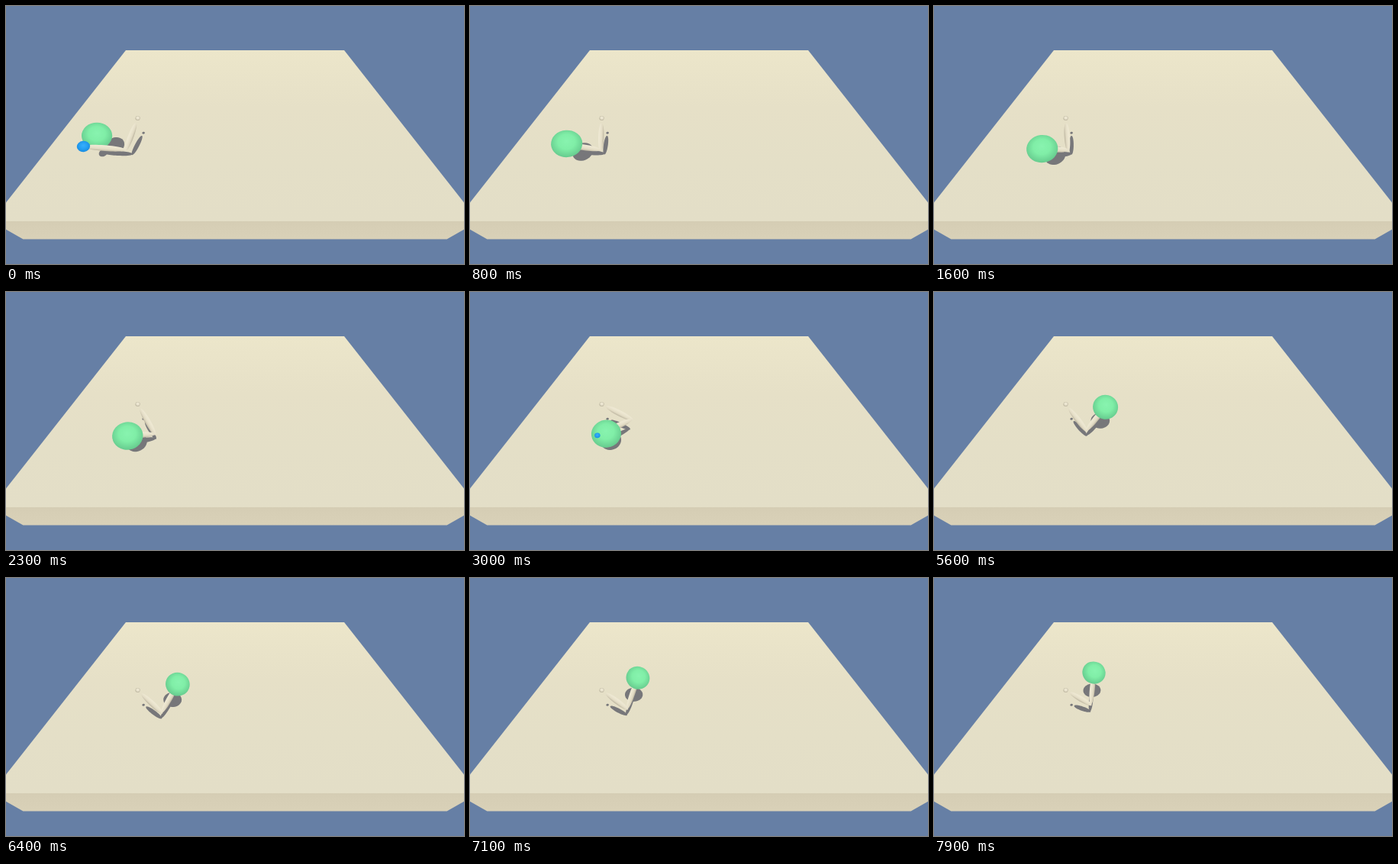
Animation of 600 by 338 pixels, one loop 8000 ms. Source, as an HTML page with a canvas:

```html
<!DOCTYPE html>
<html>
<head>
<meta charset="utf-8">
<style>
html, body { margin: 0; width: 100%; height: 100%; overflow: hidden; background: #667fa5; }
canvas { display: block; }
</style>
</head>
<body>
<canvas id="stage" width="600" height="338"></canvas>
<script>
const ctx = document.getElementById('stage').getContext('2d');
const LOOP = 8000, STEP = 100, SHADOW = '#77777a';
const CX = 300, CY = 169, FOCAL = CY * Math.sqrt(3);

// World points are [right, away, up]; the camera hangs 1 above the table, tilted down 45 degrees
const SHOULDER = [-0.446, 0.779, 0.33];
const UPPER = 0.157, FORE = 0.165, ORBIT = 0.18, BALL_UP = 0.315;
const BALL_R = 0.0565, HAND_R = 0.0235, JOINT_R = 0.0102, LIMB = 0.0265;
const TABLE = { half: 1.113, near: 0.443, far: 2.221, thick: 0.217 };

const { sin, cos, sqrt, exp, hypot, PI } = Math;
const rad = deg => deg * PI / 180;
const pulse = (t, mid, width) => exp(-(((t - mid) / width) ** 2));
const mix = (a, b, k) => a.map((p, i) => p + (b[i] - p) * k);
const along = (p, dir, k) => p.map((v, i) => v + dir[i] * k);
const depth = ([, v, w]) => (v + 1 - w) / Math.SQRT2;
const shade = ([x, v, w]) => [x - 0.42 * w, v + 0.727 * w, 0];

function project(p) {
  const k = FOCAL / depth(p);
  return [CX + p[0] * k, CY + (1 - p[2] - p[1]) / Math.SQRT2 * k];
}

// Ball on a level orbit; the hand chases it and a two-bone solve places the elbow
function pose(t) {
  const orbit = rad(213 + 26.1 * t);
  const swing = pulse(t, 3.2, 1);
  const over = 0.066 * pulse(t, 0, 0.5);
  const lift = 0.065 * pulse(t, 4.4, 0.6);

  const ball = [...along(SHOULDER.slice(0, 2), [cos(orbit), sin(orbit)], ORBIT), BALL_UP];
  const aim = orbit - 0.2 * swing, c = cos(aim), s = sin(aim);
  const flat = ORBIT + over, rise = BALL_UP - SHOULDER[2] + lift - 0.45 * over;
  const hand = along(SHOULDER, [c * flat, s * flat, rise], 1);

  const d = hypot(flat, rise), k = flat / d, m = rise / d;
  const reach = (UPPER ** 2 + d * d - FORE ** 2) / (2 * d);
  const bend = sqrt(UPPER ** 2 - reach ** 2);
  const twist = rad(-20 + 49 * exp(-t / 1.6) + 90 * swing);
  let elbow = along(SHOULDER, [c * k, s * k, m], reach);
  elbow = along(elbow, [-s, c, 0], bend * sin(twist));
  elbow = along(elbow, [c * m, s * m, -k], bend * cos(twist));
  return { ball, hand, elbow };
}

function poly(fill, pts) {
  ctx.fillStyle = fill;
  ctx.beginPath();
  pts.forEach(p => ctx.lineTo(...project(p)));
  ctx.fill();
}

function gradient(g, ...colors) {
  colors.forEach((c, i) => g.addColorStop(i / (colors.length - 1), c));
  return g;
}

function sphere(p, r, ...colors) {
  const [x, y] = project(p), px = FOCAL * r / depth(p);
  ctx.save();
  ctx.translate(x, y);
  ctx.rotate(Math.atan((y - CY) / (x - CX)));
  ctx.scale(px * hypot(1, (x - CX) / FOCAL, (y - CY) / FOCAL), px);
  ctx.fillStyle = gradient(ctx.createRadialGradient(0, -0.2, 0, 0, -0.1, 1.1), ...colors);
  ctx.beginPath();
  ctx.arc(0, 0, 1, 0, 2 * PI);
  ctx.fill();
  ctx.restore();
}

// Disc facing the light, dropped onto the table
function sphereShadow(p, r) {
  const rim = Array.from({ length: 40 }, (_, i) => {
    const a = i * PI / 20, q = along(p, [0.866, 0.5, 0], r * cos(a));
    return shade(along(q, [-0.383, 0.663, 0.643], r * sin(a)));
  });
  poly(SHADOW, rim);
}

function limb(from, to, ...colors) {
  const a = project(from), b = project(to);
  const w = FOCAL * LIMB / depth(mix(from, to, 0.5)) / 2;
  const len = hypot(b[0] - a[0], b[1] - a[1]);
  ctx.save();
  ctx.translate(...a);
  ctx.rotate(Math.atan2(b[1] - a[1], b[0] - a[0]));
  // Keep the lit side up
  if (b[0] < a[0]) ctx.scale(1, -1);
  ctx.fillStyle = gradient(ctx.createLinearGradient(0, -w, 0, w), ...colors);
  ctx.beginPath();
  ctx.moveTo(0, 0);
  ctx.bezierCurveTo(0, -w * 1.33, len, -w * 1.33, len, 0);
  ctx.bezierCurveTo(len, w * 1.33, 0, w * 1.33, 0, 0);
  ctx.fill();
  ctx.restore();
}

const ivory = (a, b) => limb(a, b, '#efe9d4', '#ebe5cf', '#e2dbc4', '#bdb6a1');

function table() {
  const { half, near, far, thick } = TABLE;
  ctx.fillStyle = '#667fa5';
  ctx.fillRect(0, 0, 600, 338);
  poly(gradient(ctx.createLinearGradient(0, 58, 0, 282), '#ece6ca', '#e6e0c7', '#e4dfc7', '#e3dec7'),
    [[-half, far, 0], [half, far, 0], [half, near, 0], [-half, near, 0]]);
  poly(gradient(ctx.createLinearGradient(0, 282, 0, 305), '#d5cdb4', '#d9d1b8'),
    [[-half, near, 0], [half, near, 0], [half, near, -thick], [-half, near, -thick]]);
}

// Radius of the part of the hand that sticks out of the ball
function exposed(ball, hand) {
  const gap = hypot(...along(hand, ball, -1));
  const cut = Math.max(0, (BALL_R ** 2 - gap ** 2 - HAND_R ** 2) / (2 * gap));
  return sqrt(Math.max(0, HAND_R ** 2 - cut ** 2));
}

function draw(t) {
  const { ball, hand, elbow } = pose(t);
  const start = mix(SHOULDER, elbow, 0.15), tip = mix(SHOULDER, elbow, 1.04);
  const drawBall = () => sphere(ball, BALL_R, '#88f3af', '#80eea7', '#66cb8e');
  const drawFore = () => ivory(elbow, hand);
  table();

  sphereShadow(SHOULDER, JOINT_R * 0.8);
  sphereShadow(ball, BALL_R);
  sphereShadow(hand, HAND_R);
  limb(shade(start), shade(tip), SHADOW, SHADOW);
  limb(shade(elbow), shade(hand), SHADOW, SHADOW);

  sphere(SHOULDER, JOINT_R, '#f1ebd7', '#e8e2cc', '#b5ae99');
  ivory(start, tip);
  // A hand hanging below the ball brings the forearm in front
  const layers = hand[2] < ball[2] - 0.01 ? [drawBall, drawFore] : [drawFore, drawBall];
  layers.forEach(f => f());

  const r = exposed(ball, hand);
  if (r > 0) sphere(hand, r, '#38aefb', '#27a2f5', '#188ce0');
}

function frame(now) {
  draw(Math.floor(now % LOOP / STEP) * STEP / 1000);
  requestAnimationFrame(frame);
}
requestAnimationFrame(frame);
</script>
</body>
</html>
```
